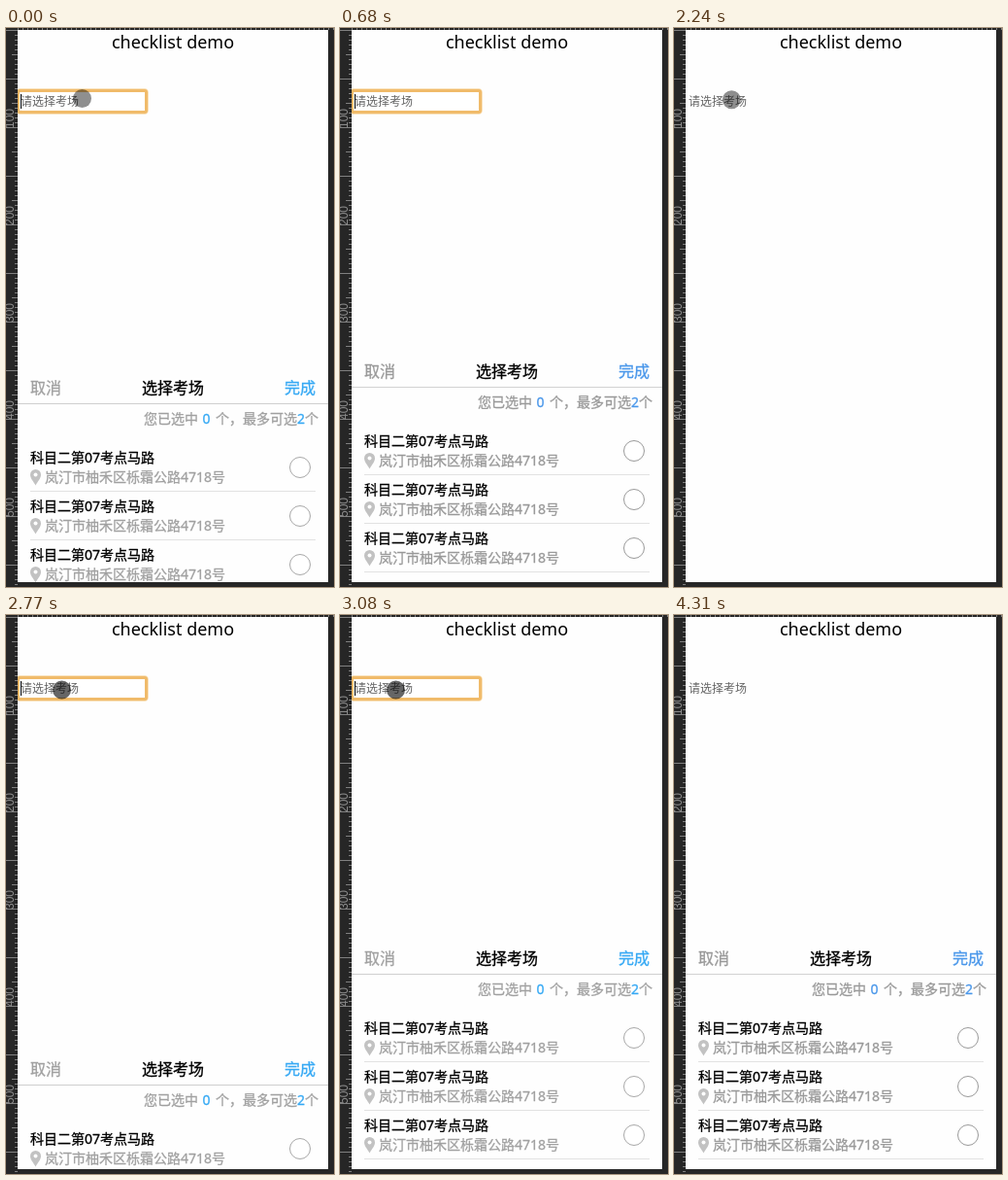
Animation, 338 px wide and 575 px high, one loop 4.41 s. Source, as an HTML page:

```html
<!DOCTYPE html>
<html lang="zh-CN">
<head>
<meta charset="utf-8">
<title>checklist demo</title>
<style>
  html, body { margin: 0; width: 100%; height: 100%; overflow: hidden; background: #262626; }
  svg { display: block; width: 338px; height: 575px; }
  text { font-family: "Noto Sans", "Noto Sans CJK SC", "Noto Sans CJK", sans-serif; white-space: pre; }
  #ruler text { font: 12px "Liberation Sans", Arial, sans-serif; fill: #8c8c8c; }
  #sheet { --blue: #4a97ea; --grey: #999; --line: #d2d2d2; --ring: #9a9a9a; }
  #sheet.moving { --blue: #36a9f4; --grey: #a0a0a0; --line: #cfcfcf; --ring: #a8a8a8; }
  #sheet text { stroke-width: .3px; }
  .black { fill: #000; stroke: #000; }
  .blue { fill: var(--blue); stroke: var(--blue); }
  .grey { fill: var(--grey); stroke: var(--grey); }
  .rule { fill: var(--line); }
  .thin { fill: #e2e2e2; }
  .pin { fill: #c2c2c2; }
  .radio { fill: #fff; stroke: var(--ring); }
</style>
</head>
<body>
<svg viewBox="0 0 338 575">
  <defs><clipPath id="page"><rect x="12" y="2" width="320" height="568"/></clipPath></defs>
  <rect width="338" height="575" fill="#262626"/>
  <g id="ruler"></g>
  <g clip-path="url(#page)">
    <rect x="12" y="2" width="320" height="568" fill="#fefefe"/>
    <text x="172" y="21" font-size="18" text-anchor="middle">checklist demo</text>
    <g id="focus">
      <rect x="12.5" y="64.5" width="132" height="22" rx="2" fill="none" stroke="#f9e2bd" stroke-width="5"/>
      <rect x="12.5" y="64.5" width="132" height="22" rx="1.5" fill="#fff" stroke="#f0bb6a" stroke-width="3"/>
    </g>
    <text x="15" y="79.7" font-size="12" fill="#666">请选择考场</text>
    <rect id="caret" x="15" y="68" width="1" height="15"/>
    <g id="sheet"></g>
    <circle id="dot" r="9.5"/>
  </g>
  <path id="arrow" d="M0 0V14L3.5 11L6 16L8 15L6 10H10Z" fill="#fff" stroke="#000" stroke-width=".5"/>
</svg>
<script>
const LOOP = 4410;
const RELOAD = 1420;    // page resets: sheet and focus vanish
const OPEN = 2633;      // sheet starts to rise
const LEAD = 307;       // the loop begins this far into an earlier rise
const RISE = 460;
const SETTLED = 477;
const EXIT = 3590;      // pointer leaves the page on the right
const BLUR = 4310;
const BLINK = 490;

const $ = id => document.getElementById(id);

function add(parent, tag, attrs, content) {
  const el = document.createElementNS("http://www.w3.org/2000/svg", tag);
  for (const k in attrs) el.setAttribute(k, attrs[k]);
  if (content) el.textContent = content;
  parent.append(el);
  return el;
}

function buildRuler() {
  const g = $("ruler");
  const bar = (x, y, width, height) => add(g, "rect", { x, y, width, height, fill: "#808080" });
  for (let v = 0; v < 575; v += 5) {
    const len = v % 50 === 0 ? 12 : v % 25 === 0 ? 6 : 3;
    bar(12 - len, v + 2, len, 1);
    bar(12 + v, 0, 1, 2);
    if (v && v % 100 === 0) {
      add(g, "text", { transform: `translate(8 ${v - 7}) rotate(-90)`, "text-anchor": "middle" }, v);
    }
  }
}

function buildSheet() {
  const g = $("sheet");
  // cy is the middle of the line of characters
  const text = (x, cy, size, cls, str, anchor = "start") =>
    add(g, "text", { x, y: cy + size * 0.38, "font-size": size, class: cls, "text-anchor": anchor }, str);
  const rule = (x, y, width, cls) => add(g, "rect", { x, y, width, height: 1, class: cls });

  add(g, "rect", { x: 12, y: 335, width: 320, height: 300, fill: "#fefefe" });
  text(25, 352.5, 16, "grey", "取消");
  text(172, 352.5, 16, "black", "选择考场", "middle");
  text(319, 352.5, 16, "blue", "完成", "end");
  rule(12, 369, 320, "rule");

  text(142, 385, 14, "grey", "您已选中");
  text(202.5, 385, 14, "blue", "0");
  text(300, 385, 14, "grey", "个，最多可选", "end");
  text(300, 385, 14, "blue", "2");
  text(322, 385, 14, "grey", "个", "end");

  for (let i = 0; i < 3; i++) {
    const row = 410 + i * 50;
    text(25, row + 15, 14, "black", "科目二第07考点马路");
    add(g, "path", {
      transform: `translate(30.5 ${row + 32.5})`, class: "pin",
      d: "M0 11C-2 7 -5.5 4 -5.5 0a5.5 5.5 0 0 1 11 0C5.5 4 2 7 0 11Z"
    });
    add(g, "circle", { cx: 30.5, cy: row + 32.5, r: 2, fill: "#fff" });
    text(40, row + 35, 14, "grey", "岚汀市柚禾区栎霜公路4718号");
    add(g, "circle", { cx: 303, cy: row + 25, r: 10.5, class: "radio" });
    rule(25, row + 49, 294, "thin");
  }
}

const clamp = k => Math.min(1, Math.max(0, k));
const smooth = k => k * k * (3 - 2 * k);

// CSS "ease": cubic-bezier(.25, .1, .25, 1), solved by bisection
function ease(x) {
  let lo = 0, hi = 1;
  for (let i = 0; i < 20; i++) {
    const s = (lo + hi) / 2;
    if (0.75 * s * (1 - s) + s ** 3 < x) lo = s; else hi = s;
  }
  return 0.3 * lo * (1 - lo) ** 2 + 3 * lo * lo * (1 - lo) + lo ** 3;
}

// Pointer moves: start, end, x, y
const home = [78.5, 72.5];
const moves = [
  [340, 410, 80.5, 81.5],
  [580, 680, 24, 56],
  [1400, RELOAD, 14, 2],
  [RELOAD, 1620, 204, 153],
  [1640, 1920, 57.5, 84.5],
  [1940, 2060, 62.5, 68.5],
  [2200, 2270, 57.5, 77],
  [3330, EXIT, 330, 350]
];

function pointer(t) {
  return moves.reduce(([px, py], [from, to, x, y]) => {
    const k = smooth(clamp((t - from) / (to - from)));
    return [px + (x - px) * k, py + (y - py) * k];
  }, home);
}

const show = (el, on) => { el.style.display = on ? "" : "none"; };
const move = (el, x, y) => el.setAttribute("transform", `translate(${x} ${y})`);

function draw(t) {
  const since = t < RELOAD ? t + LEAD : t - OPEN;
  const open = since >= 20;
  const moving = open && since < SETTLED;
  const blink = Math.floor((since - SETTLED) / BLINK);

  show($("focus"), open && t < BLUR);
  show($("caret"), moving || blink === 1);

  show($("sheet"), open);
  move($("sheet"), 0, Math.round(235 * (1 - ease(clamp(since / RISE)))));
  $("sheet").classList.toggle("moving", moving);

  show($("dot"), t < 680 || (t >= RELOAD && t < EXIT));
  move($("dot"), ...pointer(t));
  $("dot").setAttribute("fill-opacity", moving && t > OPEN ? 0.6 : 0.44);

  // over the dark frame the pointer is an arrow gliding down the edge
  show($("arrow"), t >= EXIT && t < EXIT + 110);
  move($("arrow"), 336.3, 351 + (t - EXIT) * 1.6);
}

buildRuler();
buildSheet();
const begin = performance.now();
function tick() {
  draw((performance.now() - begin) % LOOP);
  requestAnimationFrame(tick);
}
draw(0);
requestAnimationFrame(tick);
</script>
</body>
</html>
```
